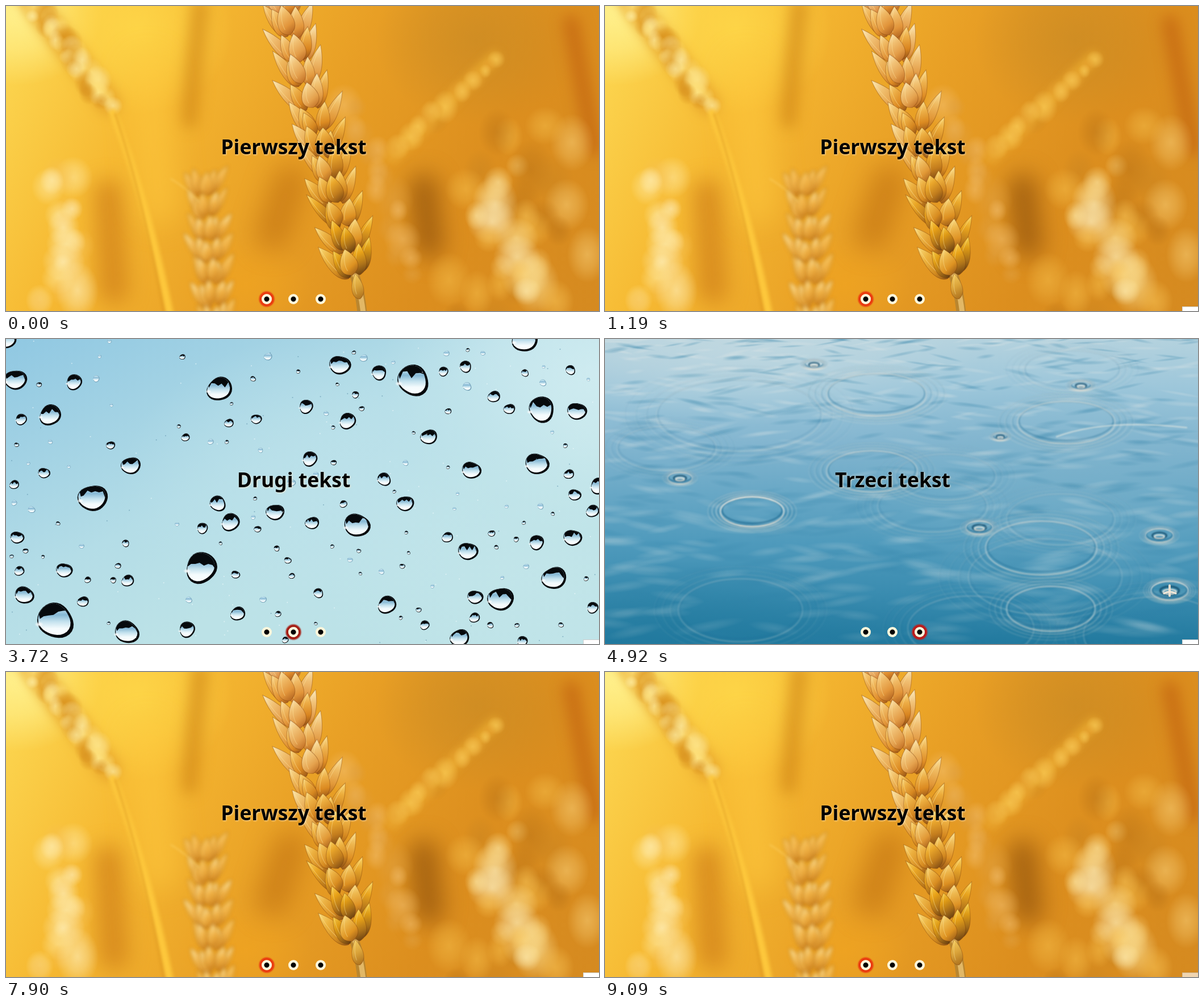
Write an HTML page with a canvas that moves like this. It is 1044 px wide and 537 px high and loops after 9150 ms.

```html
<!DOCTYPE html>
<html lang="pl">
<head>
<meta charset="utf-8">
<title>Slider</title>
<style>
html, body { margin: 0; width: 100%; height: 100%; overflow: hidden; }
.slide, canvas { position: absolute; left: 0; top: 0; width: 1044px; height: 537px; }
.slide { overflow: hidden; }
#water { animation: second 9150ms step-end infinite; }
#lake { animation: third 9150ms step-end infinite; }
@keyframes second {
  0%, 53.7705% { visibility: hidden; }
  20.9836% { visibility: visible; }
}
@keyframes third {
  0%, 86.3388% { visibility: hidden; }
  53.7705% { visibility: visible; }
}
h1 {
  position: absolute; left: 0; top: 229px; width: 1013px; margin: 0;
  font: bold 35.5px/36px "Noto Sans", "Open Sans", sans-serif;
  text-align: center; white-space: nowrap; color: #000;
  text-shadow: 1px 1px 3px rgba(255, 236, 205, .75);
}
i {
  position: absolute; left: 450px; top: 507px; width: 18px; height: 18px;
  border-radius: 50%; background: radial-gradient(#000 4px, #fff8dc 5px);
}
i:nth-of-type(2) { left: 497px; }
i:nth-of-type(3) { left: 544.5px; }
.on { box-shadow: 0 0 2px 4.5px var(--ring); }
#corner {
  position: absolute; left: 1016px; top: 529px; width: 28px; height: 8px;
  box-sizing: border-box; background: #fff;
  border: solid rgba(90, 90, 90, .3); border-width: 1px 0 0 1px;
  animation: corner 9150ms step-end infinite;
}
@keyframes corner {
  0% { opacity: 0; }
  12.2404% { opacity: .45; }
  13.0055% { opacity: 1; }
  99.3443% { opacity: .65; }
}
</style>
</head>
<body>
<div class="slide" id="wheat" style="--ring:#ea3a10">
  <canvas width="1044" height="537"></canvas>
  <h1>Pierwszy tekst</h1><i class="on"></i><i></i><i></i>
</div>
<div class="slide" id="water" style="--ring:#a51c12">
  <canvas width="1044" height="537"></canvas>
  <h1>Drugi tekst</h1><i></i><i class="on"></i><i></i>
</div>
<div class="slide" id="lake" style="--ring:#c01a18">
  <canvas width="1044" height="537"></canvas>
  <h1>Trzeci tekst</h1><i></i><i></i><i class="on"></i>
</div>
<div id="corner"></div>
<script>
const W = 1044, H = 537, TAU = Math.PI * 2;
let g, seed;

const rnd = (a = 0, b = 1) => {
  seed = (seed * 16807) % 2147483647;
  return a + (b - a) * seed / 2147483647;
};

function paint(id, start) {
  g = document.querySelector('#' + id + ' canvas').getContext('2d');
  seed = start;
}

function ramp(x0, y0, x1, y1, colors) {
  const r = g.createLinearGradient(x0, y0, x1, y1);
  colors.forEach((c, i) => r.addColorStop(i / (colors.length - 1), c));
  return r;
}

function backdrop(fill) {
  g.fillStyle = fill;
  g.fillRect(0, 0, W, H);
}

// soft elliptical spot that fades to nothing
function spot(x, y, rx, ry, color, alpha = 1, turn = 0) {
  const r = g.createRadialGradient(0, 0, 0, 0, 0, 1);
  r.addColorStop(0, color);
  r.addColorStop(.5, color + '99');
  r.addColorStop(1, color + '00');
  g.save();
  g.globalAlpha = alpha;
  g.translate(x, y);
  g.rotate(turn);
  g.scale(rx, ry);
  g.fillStyle = r;
  g.fillRect(-1, -1, 2, 2);
  g.restore();
}

// random spots along a segment
function scatter(n, x0, y0, x1, y1, spread, size, colors, alpha) {
  for (let k = 0; k < n; k++) {
    const t = (k + rnd()) / n, r = size * rnd(.6, 1.4);
    spot(x0 + (x1 - x0) * t + rnd(-spread, spread), y0 + (y1 - y0) * t + rnd(-spread, spread) / 2,
      r, r * rnd(.9, 1.4), colors[k % colors.length], alpha);
  }
}

function line(x0, y0, cx, cy, x1, y1, width, color, blur = 0) {
  g.save();
  g.filter = blur ? `blur(${blur}px)` : 'none';
  g.lineWidth = width;
  g.lineCap = 'round';
  g.strokeStyle = color;
  g.beginPath();
  g.moveTo(x0, y0);
  g.quadraticCurveTo(cx, cy, x1, y1);
  g.stroke();
  g.restore();
}

const streak = (x0, y0, x1, y1, width, color, blur) =>
  line(x0, y0, (x0 + x1) / 2, (y0 + y1) / 2, x1, y1, width, color, blur);

/* ---- wheat ---- */

function grain(x, y, len, w, angle, tones) {
  g.save();
  g.translate(x, y);
  g.rotate(angle);
  g.fillStyle = ramp(0, w * .4, len, -w * .4, tones);
  g.strokeStyle = 'rgba(120,58,8,.4)';
  g.lineWidth = 1;
  g.beginPath();
  g.moveTo(0, 0);
  g.bezierCurveTo(len * .1, -w * .8, len * .6, -w * .65, len, 0);
  g.bezierCurveTo(len * .65, w * .5, len * .2, w * .8, 0, 0);
  g.fill();
  g.stroke();
  g.strokeStyle = 'rgba(255,232,165,.45)';
  g.beginPath();
  g.moveTo(len * .2, -w * .2);
  g.quadraticCurveTo(len * .5, -w * .35, len * .95, 0);
  g.stroke();
  g.restore();
}

// two outer grains, two inner ones and a middle one at every step down the axis
function ear(x0, y0, x1, y1, n, size, palette) {
  const up = Math.atan2(y0 - y1, x0 - x1);
  for (let k = 0; k < n; k++) {
    const t = k / (n - 1), x = x0 + (x1 - x0) * t, y = y0 + (y1 - y0) * t;
    const put = (side, spread, len, w, tilt) =>
      grain(x + side * spread * size, y - rnd(0, 12) * size, len * size * rnd(.85, 1.1),
        w * size * rnd(.85, 1.15), up + side * tilt + rnd(-.12, .12), palette(t));
    put(-1, 10, 74, 22, .46);
    put(1, 12, 70, 22, .58);
    put(-1, 8, 56, 26, .22);
    put(1, 9, 58, 25, .3);
    put(k % 2 ? -1 : 1, 4, 52, 27, .1);
  }
}

paint('wheat', 71);
const pale = ['#ffe9a0', '#f6c052', '#fff3c4'];
const amber = ['#f6c04c', '#c98420', '#fbd680', '#b87216'];
backdrop(ramp(0, 0, W, H, ['#fdda54', '#f6b932', '#e89f25', '#dc8e1e', '#d58a20']));
spot(20, 10, 150, 130, '#fff08c');
spot(230, 40, 170, 150, '#ffd94a', .8);
spot(830, 60, 180, 150, '#c98a24', .7);
spot(420, 490, 120, 80, '#f0a420', .7);
streak(342, 0, 322, 200, 30, 'rgba(206,130,20,.6)', 12);
streak(995, 30, 1035, 250, 28, 'rgba(190,92,14,.6)', 12);
streak(180, 330, 190, 500, 50, 'rgba(200,118,20,.6)', 18);
streak(735, 320, 745, 420, 50, 'rgba(140,78,10,.7)', 20);
streak(500, 310, 470, 400, 60, 'rgba(190,112,18,.6)', 22);
streak(250, 120, 270, 350, 70, 'rgba(255,204,64,.5)', 24);

scatter(26, 840, 220, 920, H, 150, 30, amber, .5);
scatter(14, 845, 300, 930, H, 45, 32, pale, .6);
scatter(16, 605, 150, 715, 480, 20, 26, ['#f3c070', '#e0a040'], .55);
scatter(20, 110, 280, 95, H, 38, 28, pale, .6);
streak(860, 90, 680, 265, 20, 'rgba(240,178,50,.7)', 8);
scatter(18, 860, 90, 680, 265, 10, 18, ['#fbcf5c', '#e6a030'], .6);

// far ear and its stalk
streak(45, -10, 180, 170, 46, 'rgba(232,166,44,.8)', 9);
scatter(36, 52, 0, 182, 180, 20, 18, ['#ffe37c', '#d9921e', '#fff0a8'], .7);
line(188, 188, 248, 340, 292, 560, 13, '#fdc83c', 3);
line(192, 190, 240, 330, 282, 560, 3, 'rgba(206,130,20,.45)', 2);

// nearer ear at the bottom
g.filter = 'blur(3px)';
ear(349, 338, 372, 610, 8, .78, () => ['#cf8420', '#efb044', rnd() < .5 ? '#ffe6a0' : '#fbc860']);
g.filter = 'none';
line(340, 345, 320, 322, 290, 304, 2, 'rgba(255,218,120,.6)', 2);

// main ear
line(612, 470, 624, 500, 628, 550, 17, '#b9862f');
line(613, 470, 625, 500, 630, 550, 9, '#e2b866');
ear(493, 20, 614, 480, 12, 1, t => {
  const light = rnd(-8, 8) - 16 * t, tone = (h, s, l) => `hsl(${h + 4 * t},${s}%,${l + light}%)`;
  return [tone(27, 72, 42), tone(32, 74, 59), tone(36, 82, 70), tone(43, 95, 87)];
});
grain(623, 516, 46, 20, -1.75, ['#a86c1a', '#dba43a', '#f6cf62']);

/* ---- drops on glass ---- */

function drop(x, y, r) {
  const p = rnd(0, TAU), clear = r < 8 && rnd() < .35;
  const blob = (k, dx, dy, fill) => {
    g.fillStyle = fill;
    g.beginPath();
    for (let a = 0; a < TAU; a += .2) {
      const d = k * (1 + .07 * Math.sin(2 * a + p) + .04 * Math.sin(3 * a + 2 * p));
      g.lineTo(dx + d * Math.cos(a), dy + d * Math.sin(a) * .95);
    }
    g.fill();
  };
  g.save();
  g.translate(x, y);
  g.scale(r, r);
  blob(1, 0, 0, clear ? '#6f9db4' : '#06090c');
  blob(.89, -.06, -.06, ramp(0, -.7, 0, .8, ['#bfe0ee', '#86b8d4', '#c4e2ee', '#f4fbfd', '#fafdfe']));
  if (!clear) {
    g.clip();
    g.fillStyle = '#06090c';
    g.beginPath();
    g.moveTo(-1.1, -1.1);
    g.lineTo(-.85, -.1);
    for (let k = 0; k <= 5; k++) g.lineTo(-.65 + k * .27, rnd(-.6, -.1));
    g.lineTo(.9, .1);
    g.lineTo(1.1, -1.1);
    g.fill();
  }
  g.restore();
  if (r > 5) spot(x - r * .9, y + r * .2, r * .25, r * .15, '#ffffff');
}

paint('water', 4217);
backdrop(ramp(0, 0, 260, H, ['#90c8e2', '#a2d2e4', '#b4dde7', '#bce2e7']));
spot(1040, 60, 380, 280, '#d8f0f4', .7);
spot(620, 260, 420, 280, '#bde2eb', .8);
spot(940, 420, 380, 260, '#c4e6ea', .7);
const drops = [
  [87, 496, 32], [344, 403, 28], [717, 73, 28], [153, 280, 25], [376, 88, 22], [943, 124, 23],
  [618, 328, 22], [871, 458, 22], [213, 516, 21], [965, 421, 21], [914, 2, 22], [935, 220, 20],
  [17, 72, 19], [78, 134, 19], [588, 46, 18]
];
for (let k = 0; k < 900 && drops.length < 165; k++) {
  const x = rnd(0, W), y = rnd(0, H), r = 3 + 14 * rnd() ** 2.2;
  const bare = x > 225 && x < 300;
  if (!bare && drops.every(d => Math.hypot(d[0] - x, d[1] - y) > d[2] + r + 8)) drops.push([x, y, r]);
}
drops.forEach(d => drop(...d));
for (let k = 0; k < 110; k++) spot(rnd(0, W), rnd(0, H), 1.5, 1.5, k % 3 ? '#f4fbfd' : '#5f93ac', .7);

/* ---- rain on a lake ---- */

function ring(x, y, rx, ry, width, color, alpha) {
  g.globalAlpha = alpha;
  g.lineWidth = width;
  g.strokeStyle = color;
  g.beginPath();
  g.ellipse(x, y, rx, ry, 0, 0, TAU);
  g.stroke();
  g.globalAlpha = 1;
}

// young small ripples are sharp, wide ones are faint; both flatten with distance
function ripple(x, y, rx, s = rx < 60 ? .95 : .5) {
  const ry = rx * (.4 + .12 * y / H), w = Math.min(3, 1.2 + ry / 14);
  const glint = ramp(0, y - ry, 0, y + ry, ['#f4efe4', '#b4ccd4', '#fff0dc']);
  g.filter = 'blur(.8px)';
  for (let k = 0; k < 4; k++) {
    const grow = 1 + .13 * k, a = s / (1 + 1.4 * k);
    ring(x, y - w * .9, rx * grow - w, ry * grow - w, w, '#1d678e', a * .6);
    ring(x, y, rx * grow, ry * grow, w, glint, a);
  }
  if (rx < 40) {
    ring(x, y, rx * .5, ry * .45, w * 1.4, '#0f4562', s * .8);
    ring(x, y + 2, rx * .35, ry * .25, w, '#f6eee0', s);
  }
  g.filter = 'none';
}

paint('lake', 903);
backdrop(ramp(0, 0, 0, H, ['#b4d2de', '#9cc6da', '#84b6d0', '#69a8c6', '#4f9abc', '#3a8cb0', '#21799e']));
spot(250, 20, 420, 130, '#c9dce2', .6);
spot(800, 260, 380, 200, '#7fb4cc', .5);
spot(120, 500, 360, 110, '#1f789c', .45);
for (let k = 0; k < 700; k++) {
  const y = H * rnd() ** 1.5, near = y / H;
  spot(rnd(0, W), y, rnd(15, 40) + 30 * near, rnd(2, 4) + 7 * near,
    k % 2 ? '#dfe6e6' : '#2c7fa6', .28 - .16 * near, rnd(-.25, .25));
}
for (let k = 0; k < 10; k++) ripple(rnd(0, W), rnd(0, H), rnd(80, 150), .18);
[
  [368, 45, 18], [478, 98, 88], [838, 82, 19], [812, 147, 86], [696, 172, 14], [132, 245, 22],
  [259, 304, 56], [659, 332, 24], [470, 233, 80], [768, 368, 98], [976, 346, 25], [994, 443, 33],
  [785, 475, 78]
].forEach(r => ripple(...r));
line(795, 172, 880, 140, 1024, 156, 2.5, 'rgba(240,238,228,.55)', 1);
streak(994, 434, 994, 452, 4, '#e9dfd0');
line(984, 448, 994, 442, 1005, 448, 3, '#f3e8d8');
</script>
</body>
</html>
```
